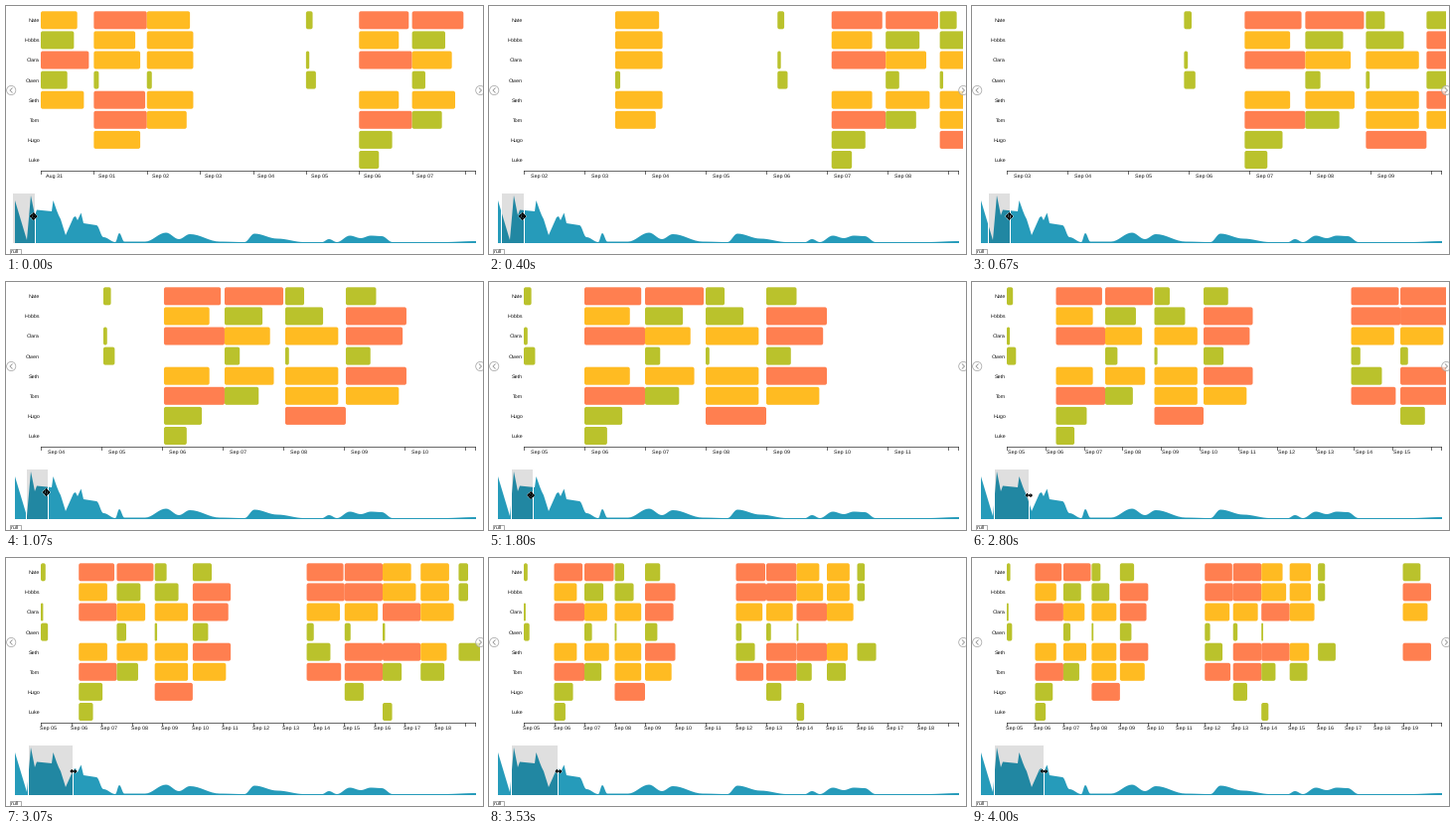
Animation, 480 px wide and 250 px high, one loop 4070 ms. Source, as a matplotlib script:

```python
import math

import numpy as np
import matplotlib.pyplot as plt
from matplotlib.animation import FuncAnimation
from matplotlib.patches import Circle, FancyBboxPatch, Rectangle
from matplotlib.patheffects import withStroke

W, H, DPI = 480, 250, 100
FRAMES, LOOP = 61, 4070
STEP = 4 / 60            # seconds per frame
EASE = 0.25              # seconds per bar transition

X0, X1, CLIP = 35, 462, 477
ROW_TOP, ROW_STEP, BAR_H = 5.3, 20.1, 18
AXIS_Y, BASE_Y = 166, 239
DAY0, DAY_PX = 4.9, 3.42  # overview scale

CORAL, YELLOW, GREEN = "#ff7f50", "#ffbb22", "#bac22c"
TEAL = "#269bba"

# Length of each shift in sixteenths of a day, one column per working day.
DAYS = [0, 1, 2, 5, 6, 7, 8, 9, 12, 13, 14, 15, 16, 19]
SHIFTS = {
    "Nate": [11, 16, 13, 2, 15, 15.5, 5, 8, 15.5, 16, 12, 12, 4, 10],
    "Hobbs": [10, 12.5, 14, 0, 12, 10, 10, 16, 16, 16, 14, 12, 4, 16],
    "Clara": [14.5, 14, 14, 1, 16, 12, 14, 15, 14, 14, 16, 14, 0, 14],
    "Owen": [8, 1.5, 1.5, 3, 0, 4, 1, 6.5, 3, 2.5, 1, 0, 0, 0],
    "Seth": [13, 15.5, 14, 0, 12, 13, 14, 16, 10, 16, 16, 11, 10, 16],
    "Tom": [0, 16, 12, 0, 16, 9, 14, 14, 14.5, 16, 8, 10, 0, 0],
    "Hugo": [0, 14, 0, 0, 10, 0, 16, 0, 0, 8, 0, 0, 0, 0],
    "Luke": [0, 0, 0, 0, 6, 0, 0, 0, 0, 0, 4, 0, 0, 0],
}

# Brush edges over time: (seconds, x)
LEFT = [(0, 6.3), (.1, 6.3), (.33, 12), (.53, 12.6), (.6, 15.4), (.667, 16),
        (.8, 16.6), (.867, 19), (1.067, 20.2), (1.4, 20.4), (1.467, 22.1)]
RIGHT = [(0, 29.3), (.1, 29.3), (.33, 34.3), (.53, 34.9), (.6, 37.6),
         (.667, 38.2), (.8, 38.8), (.867, 41.3), (1.067, 42.4), (1.4, 42.4),
         (1.467, 44.2), (2.39, 44.5), (2.467, 49), (2.93, 62.6), (3.07, 67.5),
         (3.47, 69.5), (3.53, 70.6), (3.8, 71.6), (3.95, 72)]
RESIZE_AT = 2.1

PEAKS = [(9, 196), (21, 236), (25, 191), (29, 211), (31, 205.5), (46, 207),
         (47.5, 196), (51, 206), (53, 211), (55, 215), (60, 231), (68, 213),
         (70, 212), (72, 216), (75.5, 208.5), (78, 219), (91, 221)]
WAVES = [(91, 221), (98, 233), (110, 238), (114, 229), (119, 237.5),
         (140, 237.5), (161, 228.5), (174, 235), (185, 230), (215, 237.5),
         (240, 238), (250, 229.5), (273, 234.5), (300, 238), (318, 238),
         (325, 235), (333, 238), (346, 231.5), (357, 234), (367, 231.5),
         (378, 232), (389, 238), (440, 238), (473, 237)]

plt.rcParams.update({"font.family": "Liberation Sans", "text.hinting": "none"})


def px(size):
    return size * 72 / DPI


def along(keys, t):
    return float(np.interp(t, *zip(*keys)))


def cubic(t):
    t = min(max(t, 0), 1)
    return 4 * t ** 3 if t < .5 else 1 - 4 * (1 - t) ** 3


def scale(lo, hi):
    """Offset and day width that map days lo..hi onto the plot."""
    width = (X1 - X0) / (hi - lo)
    return np.array([X0 - lo * width, width])


def build_states():
    """Brush, snapped domain and eased bar scale for every frame."""
    states, domain = [], None
    for k in range(FRAMES):
        t = k * STEP
        left, right = along(LEFT, t), along(RIGHT, t)
        snapped = (math.floor((left - DAY0) / DAY_PX),
                   math.ceil((right - DAY0) / DAY_PX))
        if domain is None:
            start = goal = scale(*snapped)
            began = t
        elif snapped != domain:
            start = start + (goal - start) * cubic((t - began) / EASE)
            goal, began = scale(*snapped), t
        domain = snapped
        bars = start + (goal - start) * cubic((t - began) / EASE)
        states.append((t, left, right, domain, bars))
    return states


def day_name(d):
    return "Aug 31" if d == 0 else f"Sep {d:02d}"


def shift_color(n):
    return CORAL if n >= 14.5 else YELLOW if n >= 11 else GREEN


def smooth(points):
    """Join points with half cosine waves."""
    out = []
    for (xa, ya), (xb, yb) in zip(points, points[1:]):
        for u in np.linspace(0, 1, 9):
            out.append((xa + (xb - xa) * u,
                        ya + (yb - ya) * (1 - math.cos(math.pi * u)) / 2))
    return out


def arrows(angles, reach=3.1, head=1.2):
    """Arrow strokes from the centre, separated by gaps."""
    strokes = []
    for a in np.radians(angles):
        c, s = math.cos(a), math.sin(a)
        for u, v in [(0, 0), (reach, 0), (reach - head, head), (reach, 0),
                     (reach - head, -head), (np.nan, np.nan)]:
            strokes.append((u * c - v * s, u * s + v * c))
    return np.array(strokes)


fig = plt.figure(figsize=(W / DPI, H / DPI), dpi=DPI, facecolor="white")
ax = fig.add_axes([0, 0, 1, 1])
ax.set_xlim(0, W)
ax.set_ylim(H, 0)
ax.axis("off")


def label(x, y, text, ha="center", size=5.4):
    return ax.text(x, y, text, ha=ha, va="baseline", fontsize=px(size),
                   color="#111111", zorder=4)


# Shift bars
frame_clip = Rectangle((0, 0), CLIP, H, transform=ax.transData)
bars = []
for row, (name, lengths) in enumerate(SHIFTS.items()):
    top = ROW_TOP + row * ROW_STEP
    label(34, top + 10.9, name, "right")
    for day, n in zip(DAYS, lengths):
        if n:
            box = FancyBboxPatch((0, top), 1, BAR_H, fc=shift_color(n), lw=0,
                                 boxstyle="round,pad=0,rounding_size=0.5")
            ax.add_patch(box)
            box.set_clip_path(frame_clip)
            bars.append((box, day, n / 16, top))

# Time axis
axis_line, = ax.plot([], [], color="#444444", lw=px(.8), zorder=3)
dates = [label(0, 173.4, "") for _ in range(16)]

# Overview with brush
area = PEAKS + smooth(WAVES)
ax.fill(*zip((9, BASE_Y), *area, (473, BASE_Y)), color=TEAL, lw=0, zorder=1)
brush = Rectangle((0, 188), 1, 51, fc=(0, 0, 0, .125), ec="white",
                  lw=px(1), zorder=2)
ax.add_patch(brush)

# Page arrows
for cx, way in ((5.2, -1), (477.3, 1)):
    ax.add_patch(Circle((cx, 85), 4.6, fc=(1, 1, 1, .6), ec="#aaaaaa",
                        lw=px(.8), zorder=5))
    ax.plot([cx - way, cx + 1.2 * way, cx - way], [82.8, 85, 87.2],
            color="#999999", lw=px(.9), zorder=6)

# Tooltip
ax.add_patch(Rectangle((3.5, 244.5), 11, 8, fc="white", ec="#999999",
                       lw=px(.8), zorder=4))
label(9, 249.2, "null", size=5.2)

MOVE = arrows([0, 90, 180, 270])
RESIZE = arrows([0, 180], 2.8)
cursor, = ax.plot([], [], color="black", lw=px(1), zorder=7,
                  path_effects=[withStroke(linewidth=px(2), foreground="white",
                                           alpha=.5)])

STATES = build_states()


def draw_axis(lo, hi):
    offset, width = scale(lo, hi)
    xs, ys = [X0, 472], [AXIS_Y, AXIS_Y]
    for x in [offset + d * width for d in range(lo, hi + 1)] + [472]:
        xs += [np.nan, x, x]
        ys += [np.nan, AXIS_Y, AXIS_Y + 3]
    axis_line.set_data(xs, ys)
    for i, text in enumerate(dates):
        d = lo + i
        text.set_visible(d < hi)
        text.set_text(day_name(d))
        text.set_x(offset + (d + .25) * width)


def draw_bars(lo, hi, offset, width):
    for box, day, length, top in bars:
        box.set_visible(lo <= day < hi)
        w = length * width
        box.set_boxstyle("round", pad=0, rounding_size=min(2, w / 2))
        box.set_bounds(offset + day * width, top, w, BAR_H)


def draw_cursor(t, left, right):
    if t < RESIZE_AT:
        x = left + along([(.7, 21.5), (1.1, 20.3), (1.5, 20)], t)
        shape = MOVE
    else:
        x, shape = right + .5, RESIZE
    y = along([(1.1, 212), (1.47, 215)], t)
    cursor.set_data(x + shape[:, 0], y + shape[:, 1])


def update(k):
    t, left, right, (lo, hi), (offset, width) = STATES[k]
    draw_axis(lo, hi)
    draw_bars(lo, hi, offset, width)
    brush.set_x(left)
    brush.set_width(right - left)
    draw_cursor(t, left, right)
    return []


anim = FuncAnimation(fig, update, frames=FRAMES, interval=LOOP / FRAMES,
                     repeat=True, repeat_delay=0, blit=False)
plt.show()
```
